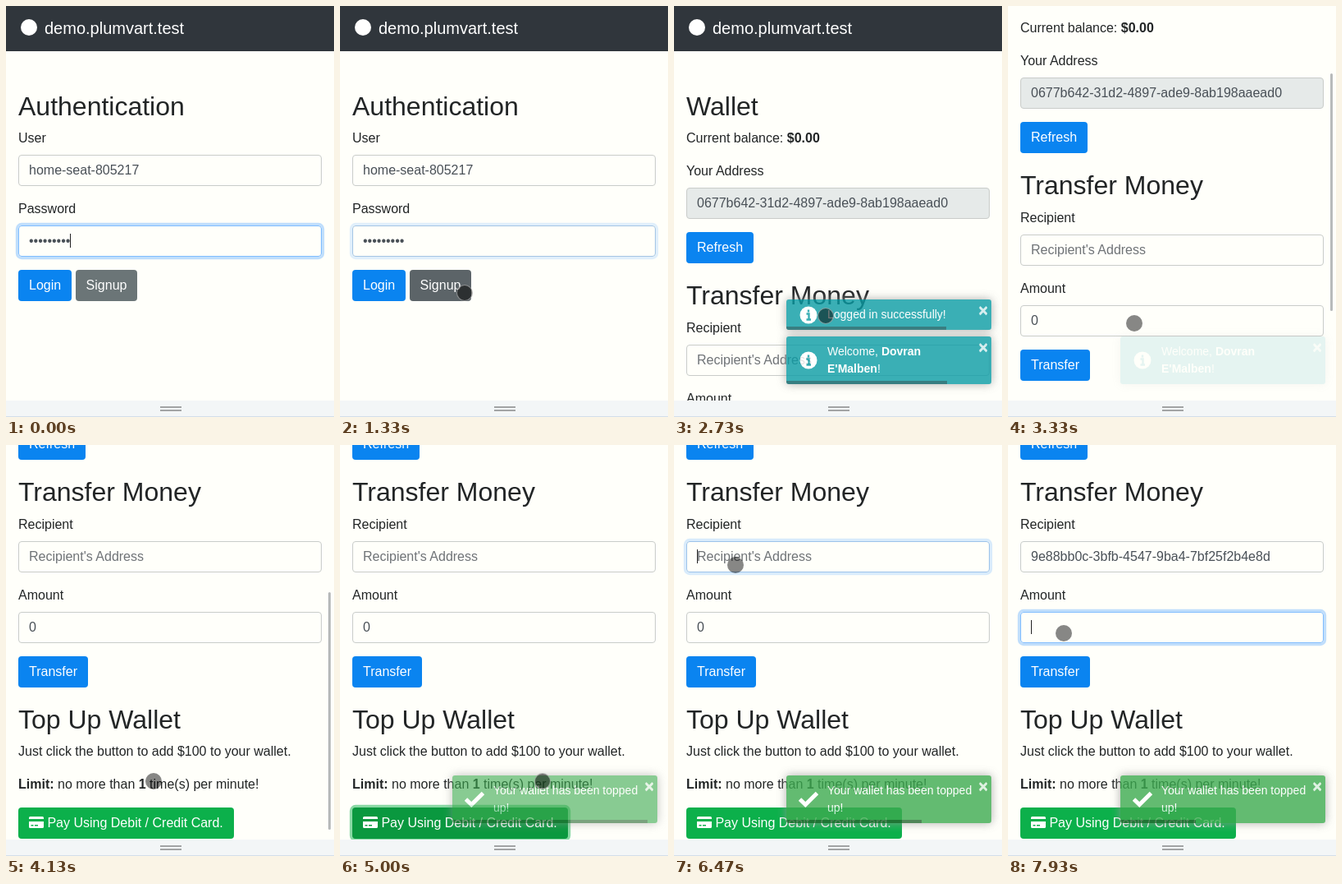
An HTML page that plays this animation: 400 by 500 pixels, repeating every 8 s.

```html
<!DOCTYPE html>
<html lang="en">
<head>
<meta charset="utf-8">
<title>Wallet demo</title>
<style>
*, ::before { box-sizing: border-box; }
html, body { margin: 0; width: 100%; height: 100%; overflow: hidden; }
body { background: #fffffa; color: #222526; font: 16px/24px "Liberation Sans", Arial, sans-serif; }
#stage { position: relative; width: 400px; height: 500px; overflow: hidden; }
#view { position: absolute; inset: 0 0 20px; overflow: hidden; }
#page { position: absolute; left: 0; top: 0; width: 400px; }
header { position: relative; height: 55px; background: #30363c; color: #fff; font-size: 20px; line-height: 30px; padding: 12px 0 0 47px; }
header::before { content: ""; position: absolute; left: 18px; top: 16px; width: 20px; height: 20px; border-radius: 50%; background: #fff; }
main { padding: 47.8px 15px 0; }
h2 { font-size: 32px; line-height: 38.4px; font-weight: 400; margin: 0 0 8px; }
p { margin: 0 0 16px; }
label { display: block; margin-bottom: 8px; }
.field { --f: 0; height: 38px; padding: 6px 12px; margin-bottom: 16px; border-radius: 4px; color: #495057; white-space: pre;
  border: 1px solid color-mix(in srgb, #80bdff calc(var(--f) * 100%), #c9ccca);
  box-shadow: 0 0 0 3.2px rgba(0, 123, 255, calc(.25 * var(--f))); }
.field.fixed { background: #e6eae9; }
.field em { font-style: normal; color: #6f7377; }
.caret { display: inline-block; width: 1px; height: 17px; margin-right: -1px; vertical-align: -3px; background: #222; }
.btn { --f: 0; display: inline-block; height: 38px; padding: 7px 13px; border-radius: 4px; color: #fff; background: #0a84f0; vertical-align: top; white-space: nowrap; }
.btn + h2 { margin-top: 20px; }
#signup { background: color-mix(in srgb, #5c6468 calc(var(--f) * 100%), #6b7577); }
#pay { background: color-mix(in srgb, #0a983f calc(var(--f) * 100%), #0cb04b);
  box-shadow: 0 0 0 3.2px rgba(20, 180, 80, calc(.5 * var(--f))); }
#pay svg { width: 18px; height: 14px; vertical-align: -1px; }
.toast { position: absolute; left: 137px; width: 250px; padding: 8px 8px 8px 50px; border-radius: 3px; overflow: hidden; color: #fff; font-size: 14px; line-height: 21px; box-shadow: 0 0 12px #999; }
.info { background: #0a9ca5; }
.success { background: #3dab50; }
.toast svg { position: absolute; left: 15px; top: 50%; width: 24px; height: 24px; margin-top: -12px; }
.toast .close { position: absolute; right: 4px; top: 3px; font: bold 20px/20px "Liberation Sans", Arial, sans-serif; text-shadow: 0 1px 0 #fff; opacity: .8; }
.toast .bar { position: absolute; left: 0; bottom: 0; height: 4px; background: #000; opacity: .4; }
#thumb { position: absolute; left: 393px; width: 3px; height: 289px; border-radius: 2px; background: #b8babb; }
#grip { position: absolute; left: 0; top: 480px; width: 400px; height: 20px; background: #f3f6f7; border-bottom: 1px solid #d3deea; }
#grip::before { content: ""; position: absolute; left: 188px; top: 7px; width: 26px; height: 6px; border: solid #a2a4a5; border-width: 2px 0; }
#touch { position: absolute; width: 20px; height: 20px; margin: -10px; border-radius: 50%; background: rgba(0, 0, 0, .47); border: 1px solid transparent; }
#touch.pressed { background: rgba(0, 0, 0, .52); border-color: rgba(255, 255, 255, .45); }
</style>
</head>
<body>
<div id="stage">
  <div id="view">
    <div id="page">
      <header>demo.plumvart.test</header>
      <main id="auth">
        <h2>Authentication</h2>
        <label>User</label>
        <div class="field">home-seat-805217</div>
        <label>Password</label>
        <div class="field" id="password">•••••••••<i class="caret"></i></div>
        <span class="btn">Login</span>
        <span class="btn" id="signup">Signup</span>
      </main>
      <main id="wallet">
        <h2>Wallet</h2>
        <p>Current balance: <b>$0.00</b></p>
        <label>Your Address</label>
        <div class="field fixed">0677b642-31d2-4897-ade9-8ab198aaead0</div>
        <span class="btn">Refresh</span>
        <h2>Transfer Money</h2>
        <label>Recipient</label>
        <div class="field" id="recipient"><span></span><i class="caret"></i><em>Recipient's Address</em></div>
        <label>Amount</label>
        <div class="field" id="amount"><span>0</span><i class="caret"></i></div>
        <span class="btn">Transfer</span>
        <h2>Top Up Wallet</h2>
        <p>Just click the button to add $100 to your wallet.</p>
        <p><b>Limit:</b> no more than <b>1</b> time(s) per minute!</p>
        <span class="btn" id="pay"><svg viewBox="0 0 18 14"><path fill="#fff" fill-rule="evenodd" d="M1.5 0h15Q18 0 18 1.5V3H0V1.5Q0 0 1.5 0ZM0 6h18v6.5q0 1.5-1.5 1.5h-15Q0 14 0 12.5ZM2.5 10v1.5h3V10ZM7 10v1.5h4V10Z"/></svg> Pay Using Debit / Credit Card.</span>
      </main>
    </div>
    <div id="thumb"></div>
    <div class="toast info" id="loggedIn" style="top:357px">Logged in successfully!</div>
    <div class="toast info" id="welcome" style="top:402px">Welcome, <b>Dovran<br>E'Malben</b>!</div>
    <div class="toast success" id="toppedUp" style="top:402px">Your wallet has been topped<br>up!</div>
  </div>
  <div id="grip"></div>
  <div id="touch"></div>
</div>
<script>
const LOOP = 8000;
const $ = id => document.getElementById(id);
const ease = u => u * u * (3 - 2 * u);
const ramp = (t, start, length) => ease(Math.min(1, Math.max(0, (t - start) / length)));
const within = (t, a, b) => t >= a && t < b;

// Interpolates [time, ...values] keys
function along(keys, t, curve = u => u) {
  if (t <= keys[0][0]) return keys[0].slice(1);
  const i = keys.findIndex(k => k[0] > t);
  if (i < 0) return keys.at(-1).slice(1);
  const a = keys[i - 1], b = keys[i], u = curve((t - a[0]) / (b[0] - a[0]));
  return a.slice(1).map((v, n) => v + (b[n + 1] - v) * u);
}

const icons = {
  info: '<circle cx="12" cy="12" r="10.5" fill="#fff"/><path d="M12 5.5v3M9.5 10.5h3v6.5M9.5 17.5h5.5" stroke="#0a9ca5" stroke-width="2.4" fill="none"/>',
  success: '<path d="M1.5 12 8.300 18.500 22.500 4.500" stroke="#fff" stroke-width="5" fill="none"/>'
};
for (const toast of document.querySelectorAll('.toast')) {
  toast.insertAdjacentHTML('beforeend',
    `<svg viewBox="0 0 24 24">${icons[toast.classList[1]]}</svg><span class="close">×</span><div class="bar"></div>`);
}

const toasts = [
  { id: 'loggedIn', start: 1630, hide: 2750, hideTime: 400 },
  { id: 'welcome', start: 1650, hide: 2850, hideTime: 620 },
  { id: 'toppedUp', start: 4770, hide: 9770, hideTime: 1000 }
];
const focusSpans = [
  { id: 'password', from: -500, to: 1255 },
  { id: 'signup', from: 1000, to: 1700 },
  { id: 'pay', from: 4380, to: 6250 },
  { id: 'recipient', from: 6385, to: 7790 },
  { id: 'amount', from: 7790, to: 9000 }
];
const touchPath = [
  [600, 190, 492], [1150, 152, 349], [1450, 152, 349], [2400, 185, 377], [2800, 185, 377],
  [3250, 154, 386], [4000, 160, 392], [4400, 238, 458], [4620, 240, 460], [5000, 247, 409],
  [5500, 180, 260], [6200, 75, 146], [7200, 75, 146], [7650, 68, 229]
];
const scrollPath = [[2780, 0], [3330, 134], [3950, 295]];
const presses = [[1250, 1400], [2680, 2800], [4450, 5050]];

function draw(t) {
  const loggedIn = t >= 1660;
  $('auth').style.display = loggedIn ? 'none' : '';
  $('wallet').style.display = loggedIn ? '' : 'none';

  const scroll = Math.round(along(scrollPath, t)[0]);
  $('page').style.top = -scroll + 'px';
  $('thumb').style.top = scroll * 480 / 797 + 1 + 'px';
  $('thumb').style.opacity = ramp(t, 2780, 80) * (1 - ramp(t, 4150, 250));

  for (const { id, from, to } of focusSpans) {
    const el = $(id), caret = el.querySelector('.caret');
    el.style.setProperty('--f', ramp(t, from, 150) * (1 - ramp(t, to, 150)));
    if (caret) {
      const on = within(t, from, to) && (t - Math.max(0, from)) % 1000 < 500;
      caret.style.visibility = on ? 'visible' : 'hidden';
    }
  }

  const pasted = t >= 6950;
  $('recipient').firstChild.textContent = pasted ? '9e88bb0c-3bfb-4547-9ba4-7bf25f2b4e8d' : '';
  $('recipient').lastChild.style.display = pasted ? 'none' : '';
  $('amount').firstChild.textContent = t < 7860 ? '0' : '';

  for (const { id, start, hide, hideTime } of toasts) {
    const el = $(id);
    el.style.opacity = .8 * ramp(t, start, 340) * (1 - ramp(t, hide, hideTime));
    const left = t < hide ? 1 - (t - start) / 5000 : 0;
    el.querySelector('.bar').style.width = Math.min(1, left) * 100 + '%';
  }

  const [x, y] = along(touchPath, t, ease), touch = $('touch');
  touch.classList.toggle('pressed', presses.some(([a, b]) => within(t, a, b)));
  touch.style.display = t < 600 ? 'none' : '';
  touch.style.left = x + 'px';
  touch.style.top = y + 'px';
}

const began = performance.now();
function tick() {
  draw((performance.now() - began) % LOOP);
  requestAnimationFrame(tick);
}
tick();
</script>
</body>
</html>
```
